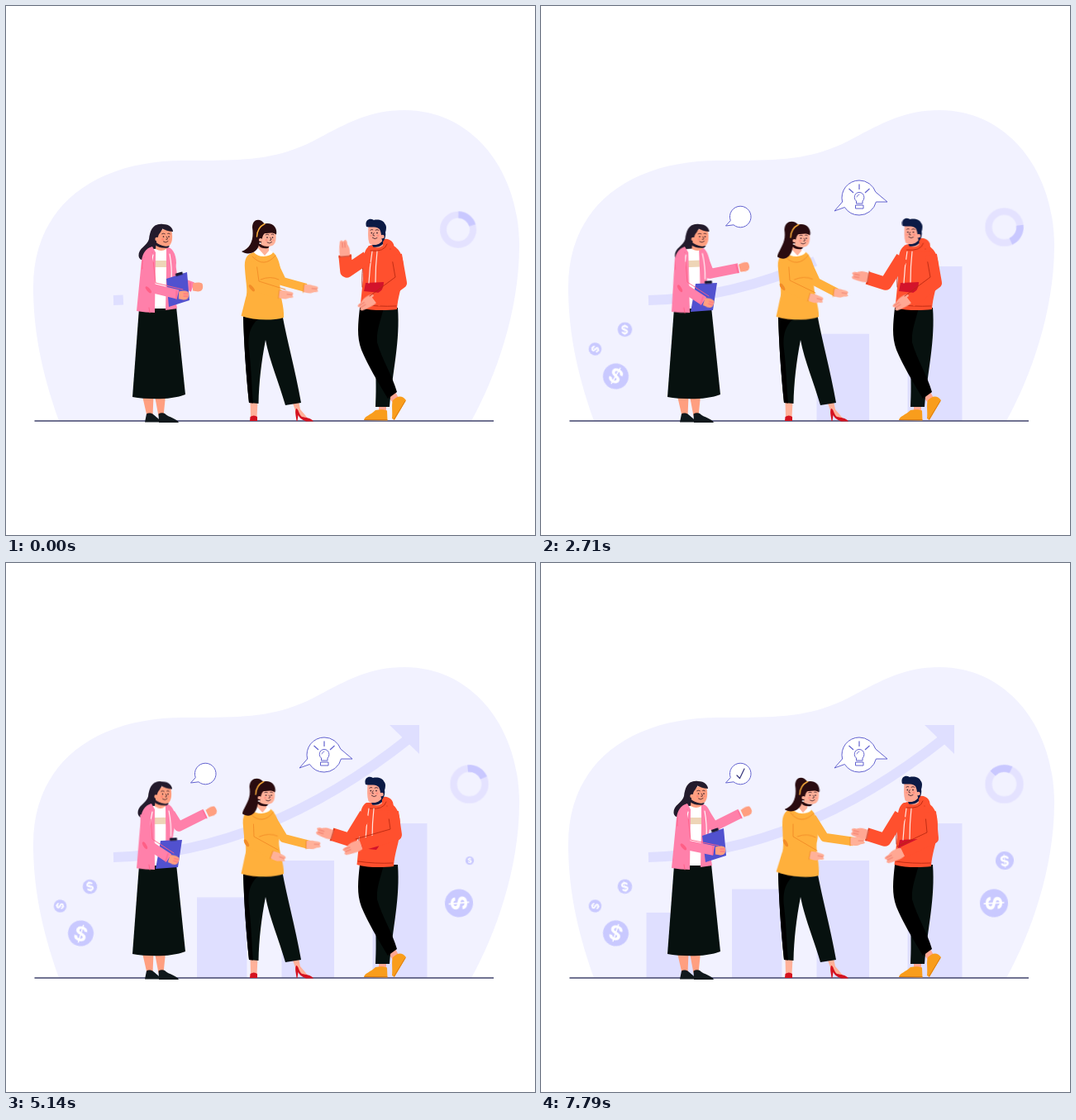
An HTML page without scripts that plays this animation: 640x640 px, repeating every 7.87 s.

```html
<!DOCTYPE html>
<html lang="en">
<head>
<meta charset="utf-8">
<title>Team meeting</title>
<style>
html,body{margin:0;width:100%;height:100%;overflow:hidden;background:#fff}
svg{display:block;width:100vw;height:100vh}
.m{animation:7.87s ease-in-out infinite}
.lin{animation-timing-function:linear}
.line{fill:none;stroke-linecap:round;stroke-linejoin:round}
.sleeve{fill:none;stroke-linejoin:round}
.crease{fill:none;stroke-width:.9;stroke-linejoin:round;stroke-linecap:round}
.ink{fill:#fff;stroke:#6262cf;stroke-width:1;stroke-linejoin:round}
.coin text{font:bold 16px Inter,"Liberation Sans",sans-serif;fill:#fff;text-anchor:middle}

/* chart */
.bar{transform-origin:0 502px;animation-timing-function:cubic-bezier(.33,.67,.67,1)}
@keyframes bar1{0%,67%{transform:scaleY(0)}98%,to{transform:none}}
@keyframes bar2{0%,44.5%{transform:scaleY(0)}74.5%,to{transform:none}}
@keyframes bar3{0%,19.5%{transform:scaleY(0)}50%,to{transform:none}}
@keyframes bar4{0%,1.6%{transform:scaleY(0)}32%,to{transform:none}}
@keyframes trend{0%{stroke-dashoffset:97}8%{stroke-dashoffset:91}20%{stroke-dashoffset:75}34.4%{stroke-dashoffset:47}47.1%{stroke-dashoffset:22}58%,to{stroke-dashoffset:0}}
@keyframes tip{0%,56.5%{transform:scale(0)}62%,to{transform:none}}
@keyframes ringIn{0%{transform:translate(547px,270.5px) scale(.95)}8%,to{transform:translate(560.5px,267.5px)}}
@keyframes ring{0%{transform:rotate(-89deg)}20%{transform:rotate(129deg)}34.4%{transform:rotate(353deg)}47.1%{transform:rotate(414deg)}65.3%{transform:rotate(624deg)}81.7%{transform:rotate(862deg)}99%,to{transform:rotate(943deg)}}

/* coins and bubbles */
@keyframes spin{to{transform:rotate(540deg)}}
@keyframes pop1{0%,4%{transform:scale(0)}10%,to{transform:none}}
@keyframes pop2{0%,12%{transform:scale(0)}19%,to{transform:none}}
@keyframes pop3{0%,23%{transform:scale(0)}30%,to{transform:none}}
@keyframes pop4{0%,45.2%{transform:scale(0)}52.5%,to{transform:none}}
@keyframes pop5{0%,62.2%{transform:scale(0)}68.7%,to{transform:none}}
@keyframes popBig{0%,1%{transform:scale(0)}7%{transform:scale(1.08)}10%,to{transform:none}}
@keyframes popSmall{0%,9%{transform:scale(0)}15%{transform:scale(1.06)}18%,to{transform:none}}
@keyframes rays{0%,22%{stroke-dashoffset:11}28%,to{stroke-dashoffset:0}}
@keyframes tick{0%,75%{stroke-dashoffset:12}80.5%,to{stroke-dashoffset:0}}

/* woman in pink */
@keyframes aBody{0%{transform:none}20%,47.1%{transform:rotate(-2.2deg)}65.3%{transform:rotate(-.8deg)}81.7%,to{transform:none}}
@keyframes aHead{0%{transform:none}20%{transform:translate(0,1px) rotate(1deg)}34.4%{transform:translate(1.5px,0)}47.1%{transform:translate(-.5px,0)}65.3%{transform:translate(-1px,.5px)}81.7%,to{transform:none}}
@keyframes aBack{
0%{d:path("M198 302L202 331L226 340")}20%{d:path("M197 302L198 330L226 340")}
34.4%{d:path("M196 303L204 324L239 317")}47.1%{d:path("M197 300L219 305L239 279")}
65.3%,to{d:path("M199 303L209 319L241 303")}}
@keyframes aBackHand{
0%,20%{transform:translate(231px,340px) rotate(0deg)}34.4%{transform:translate(245px,316px) rotate(-14deg)}
47.1%{transform:translate(241px,273px) rotate(-50deg)}65.3%,to{transform:translate(248px,301px) rotate(-25deg)}}
@keyframes aFront{
0%{d:path("M171 304L175 341L208 349")}20%,65.3%{d:path("M168 304L171 340L197 357")}
81.7%{d:path("M171 304L174 341L207 350")}99%,to{d:path("M171 304L175 341L209 348")}}
@keyframes aFrontHand{
0%{transform:translate(214px,350px) rotate(3deg)}20%,65.3%{transform:translate(202px,359px) rotate(18deg)}
81.7%{transform:translate(213px,351px) rotate(5deg)}99%,to{transform:translate(216px,348px)}}
@keyframes board{
0%{d:path("M194 330L219 322L222 356L197 364Z")}20%,65.3%{d:path("M187 336L213 335L208 368L181 370Z")}
81.7%{d:path("M193 331L218 324L220 358L196 364Z")}99%,to{d:path("M195 330L221 321L224 354L199 362Z")}}
@keyframes clip{
0%{transform:translate(209.5px,324.5px) rotate(-17deg)}20%,65.3%{transform:translate(202.5px,334.5px) rotate(-2deg)}
81.7%{transform:translate(208px,326px) rotate(-16deg)}99%,to{transform:translate(210.5px,323.5px) rotate(-18deg)}}

/* woman in yellow */
@keyframes bBody{0%{transform:none}20%,65.3%{transform:rotate(-2deg)}81.7%,to{transform:rotate(3deg)}}
@keyframes bHead{0%{transform:none}20%,65.3%{transform:translate(-1.5px,1px)}81.7%,to{transform:translate(9.5px,1px)}}
@keyframes tail{
0%,81.7%,to{d:path("M313 264C308 256 298 257 298 268C300 281 297 293 285 297C292 302 304 299 306 289C308 279 305 270 313 264Z")}
20%,65.3%{d:path("M313 264C308 257 296 258 296 270C298 284 293 288 287 302C295 308 304 304 306 291C307 281 305 272 313 264Z")}}
@keyframes bBack{
0%{d:path("M322 308L334 333L363 341")}20%{d:path("M321 308L333 332L363 343")}
34.4%{d:path("M321 308L333 334L358 347")}47.1%{d:path("M321 308L337 330L372 331")}
65.3%{d:path("M321 308L336 333L367 341")}81.7%{d:path("M328 308L338 335L363 350")}
99%,to{d:path("M328 308L343 332L378 337")}}
@keyframes bBackHand{
0%{transform:translate(363px,342px) rotate(6deg)}20%{transform:translate(363px,343px) rotate(6deg)}
34.4%{transform:translate(357px,347px) rotate(8deg)}47.1%{transform:translate(371px,331px) rotate(-12deg)}
65.3%{transform:translate(366px,341px) rotate(2deg)}81.7%{transform:translate(361px,350px) rotate(18deg)}
99%,to{transform:translate(377px,337px) rotate(0deg)}}
@keyframes bFront{
0%{d:path("M296 310L300 339L332 349")}20%,65.3%{d:path("M293 310L294 337L323 353")}
34.4%,47.1%{d:path("M293 310L295 338L326 353")}81.7%,to{d:path("M299 310L299 337L328 354")}}
@keyframes bFrontHand{
0%{transform:translate(333px,349px) rotate(6deg)}20%,65.3%{transform:translate(324px,354px) rotate(20deg)}
34.4%,47.1%{transform:translate(327px,353px) rotate(15deg)}81.7%,to{transform:translate(328px,354px) rotate(10deg)}}

/* man */
@keyframes cBody{0%,34.4%,47.1%{transform:none}20%{transform:translate(-5px,0)}65.3%{transform:translate(-4px,0)}81.7%,to{transform:translate(-1px,0)}}
@keyframes cHead{0%{transform:none}20%{transform:translate(-10px,0) rotate(-3deg)}34.4%{transform:translate(1.5px,-1px)}47.1%,65.3%{transform:translate(-1px,1px)}81.7%,to{transform:translate(1px,0)}}
@keyframes cLeft{
0%{d:path("M437 304L412 321L410 301")}20%{d:path("M433 304L414 336L390 330")}
34.4%,47.1%{d:path("M437 304L417 336L395 329")}65.3%,to{d:path("M435 304L416 335L394 328")}}
@keyframes cLeftHand{
0%{transform:translate(410px,300px) rotate(-95deg)}20%{transform:translate(390px,331px) rotate(-152deg)}
34.4%,47.1%{transform:translate(393px,328px) rotate(-170deg)}65.3%{transform:translate(392px,328px) rotate(-163deg)}
81.7%,to{transform:translate(392px,328px) rotate(-167deg)}}
@keyframes cRight{
0%,34.4%,47.1%{d:path("M472 301L478 335L447 358")}20%{d:path("M467 301L473 333L444 357")}
65.3%{d:path("M468 301L472 329L430 341")}81.7%,to{d:path("M471 301L474 333L438 350")}}
@keyframes cRightHand{
0%,34.4%,47.1%{transform:translate(443px,355px) rotate(148deg)}20%{transform:translate(441px,357px) rotate(148deg)}
65.3%{transform:translate(426px,342px) rotate(158deg)}81.7%,to{transform:translate(434px,351px) rotate(154deg)}}
</style>
</head>
<body>
<svg viewBox="0 0 640 640">
<defs>
  <path id="hand" d="M-3-4.5C2-6 7-5 13-4C15-3 15-1 13-1L15 1.5C14 3 12 3 10 3.2C6 5.5 1 5.5-3 4Z"/>
  <path id="fist" d="M-5-4.5C-1-6 5-6 6.5-4C8 0 7 4 4 5C1 6-2 5-5 4.5Z"/>
  <g id="face">
    <g fill="#2a1420"><circle r=".9"/><circle cx="7" r=".9"/></g>
    <path class="line" stroke="#2a1420" stroke-width=".8" d="M-2-3.500q2-1.500 4 0M5.500-4q1.500-1 3 .5M4 0q2 2.500 1 3.500h-1.500M0 6.500q3 2.500 6-.5"/>
    <g fill="#ff6a64" opacity=".4"><circle cx="-1" cy="3.500" r="1.500"/><circle cx="8" cy="3.500" r="1.200"/></g>
  </g>
  <g id="coin" class="coin"><circle r="10" fill="#c9c9ff"/><text y="5.800">$</text></g>
  <marker id="elbowA" markerUnits="userSpaceOnUse" markerWidth="14" markerHeight="14" viewBox="-7 -7 14 14" orient="auto"><ellipse cy="3.500" rx="5" ry="2" fill="#ff5f86"/></marker>
  <marker id="elbowB" markerUnits="userSpaceOnUse" markerWidth="14" markerHeight="14" viewBox="-7 -7 14 14" orient="auto"><ellipse cy="3.500" rx="5" ry="2" fill="#f28c28"/></marker>
</defs>

<rect width="640" height="640" fill="#fff"/>
<path fill="#f2f2ff" d="M64 502C42 440 33 390 33 340C33 240 110 187 215 187C290 187 328 187 378 160C412 142 440 126 482 126C565 126 621 200 621 290C621 370 592 450 563 502Z"/>

<g fill="#dfdfff">
  <rect class="m bar" style="animation-name:bar1" x="127.500" y="423" width="61" height="79"/>
  <rect class="m bar" style="animation-name:bar2" x="231" y="394.500" width="60.500" height="107.500"/>
  <rect class="m bar" style="animation-name:bar3" x="333.500" y="360" width="63.500" height="142"/>
  <rect class="m bar" style="animation-name:bar4" x="443.500" y="315" width="66" height="187"/>
  <path class="m lin" style="animation-name:trend" fill="none" stroke="#dfdfff" stroke-width="12" pathLength="100" stroke-dasharray="100" d="M130 356C270 352 390 290 488 212"/>
  <path class="m" style="animation-name:tip;transform-origin:482px 214px" d="M464 196H500V231Z"/>
</g>

<g class="m" style="animation-name:ringIn" fill="none" stroke-width="8.500">
  <circle r="19" stroke="#e4e2ff"/>
  <circle class="m lin" style="animation-name:ring" r="19" stroke="#c9c8ff" pathLength="100" stroke-dasharray="20 80"/>
</g>

<g transform="translate(101.500 391.500) scale(.88)"><g class="m" style="animation-name:pop1"><g class="m lin" style="animation-name:spin"><use href="#coin" transform="rotate(-6)"/></g></g></g>
<g transform="translate(65.500 415) scale(.77)"><g class="m" style="animation-name:pop2"><g class="m lin" style="animation-name:spin"><use href="#coin" transform="rotate(-74)"/></g></g></g>
<g transform="translate(90.500 448) scale(1.550)"><g class="m" style="animation-name:pop3"><g class="m lin" style="animation-name:spin"><use href="#coin" transform="rotate(24)"/></g></g></g>
<g transform="translate(548 411.500) scale(1.700)"><g class="m" style="animation-name:pop4"><g class="m lin" style="animation-name:spin"><use href="#coin" transform="rotate(-88)"/></g></g></g>
<g transform="translate(561 360) scale(1.100)"><g class="m" style="animation-name:pop5"><g class="m lin" style="animation-name:spin"><use href="#coin" transform="rotate(0)"/></g></g></g>

<g class="m" style="animation-name:popSmall;transform-origin:224px 266px">
  <path class="ink" d="M223.500 266L229.300 259.600A12.800 12.800 0 1 1 233 264.800Z"/>
  <path class="m line" style="animation-name:tick" stroke="#33337a" stroke-width="1.200" pathLength="10" stroke-dasharray="10 20" d="M237 257L240.500 260.500L246 249"/>
</g>
<g class="m" style="animation-name:popBig;transform-origin:385px 232px">
  <path class="ink" d="M355 248L364.600 237A21 21 0 0 1 385 211A21 21 0 0 1 404.800 225L419 237L405.400 237A21 21 0 0 1 385 253A21 21 0 0 1 367.400 243.500Z"/>
</g>
<g class="m" style="animation-name:pop2;transform-origin:385px 234px">
  <path class="ink" d="M381.500 239V236C377.500 233 379 225.500 385 225.500S392.500 233 389 236V239ZM380.500 241H390V245H380.500Z"/>
  <path class="line" stroke="#6262cf" stroke-width=".8" d="M382 231q.5-2.500 3-3"/>
</g>
<g fill="none" stroke="#6262cf" stroke-width="1.200">
  <path class="m" style="animation-name:rays" pathLength="10" stroke-dasharray="10 20" d="M385 222V215.500"/>
  <path class="m" style="animation-name:rays" pathLength="10" stroke-dasharray="10 20" d="M378 226L372.500 221"/>
  <path class="m" style="animation-name:rays" pathLength="10" stroke-dasharray="10 20" d="M392 226L397.500 221"/>
</g>

<path stroke="#41436c" stroke-width="1.300" d="M34.500 502H590"/>

<!-- woman in pink -->
<g>
  <path fill="#ff9f80" d="M165 472H178.500L177.500 496H170.500ZM180 472H193L190.500 496H184.500Z"/>
  <path fill="#10181c" d="M170 493.500C172 492 176 492 178 494C181 497 186 499 186 503.500H168ZM184.500 493.500C187 492 190 492 192 493C197 498 207 499 209 504H185Z"/>
  <path fill="#07110f" d="M161 366L206 364L217 470C200 477 170 476 153 473Z"/>
  <path class="m sleeve" style="animation-name:aBack" stroke="#ff80aa" stroke-width="11.500"/>
  <g class="m" style="animation-name:aBackHand"><use href="#fist" fill="#ff9f80"/><path class="crease" stroke="#ff5f86" d="M-8-5V5"/></g>
  <g class="m" style="animation-name:aHead;transform-origin:188px 292px">
    <path fill="#231b2c" d="M188 264C177 263 174 273 173 282C171 290 160 293 160.500 302C161 309 170 310 178 302L192 292Z"/>
  </g>
  <g class="m" style="animation-name:aBody;transform-origin:182px 370px">
    <path fill="#fff" d="M178 294L196 293L198 366H178Z"/>
    <path fill="#eed5b7" d="M179 308H195V316H179Z"/>
    <path fill="#ff80aa" d="M177 291C169 293 165.500 299 164 308L158 369C165 370 173 371 180 371L181 298ZM194 291C201 292 206 300 206 311L202 334L207 366L193 368L194 320Z"/>
    <path class="line" stroke="#fff" stroke-width="1.100" d="M178 301Q174 318 175 334M198 300Q201 316 200 331"/>
    <path class="crease" stroke="#ff5f86" d="M167 304Q164 310 165 318M173 365L174 371"/>
  </g>
  <g class="m" style="animation-name:aHead;transform-origin:188px 292px">
    <path fill="#ff9f80" d="M182 284H194V294Q188 298 181 294Z"/>
    <path fill="#231b2c" d="M181 285Q185 291 198 290L196 292.500Q185 293.500 180.500 289Z"/>
    <path fill="#ff9f80" d="M183 272C190 270 198 268 200 270C201.500 277 202 284 198.500 289C194 292.500 187 290 183 286Z"/>
    <path fill="#231b2c" d="M178 286C174 270 182 262 190 264C198 264 202 269 202 273C196 273 191 270 189 269.500C187 275 184 276 184 280C181 279 180 284 182 288Z"/>
    <circle cx="182.500" cy="282" r="2.200" fill="#ff9f80"/>
    <use href="#face" transform="translate(190.500 279) scale(.93)"/>
  </g>
  <path class="m" style="animation-name:board" fill="#5151cf"/>
  <rect class="m" style="animation-name:clip" x="-4.500" y="-2" width="9" height="3.500" rx="1" fill="#191a33"/>
  <path class="m sleeve" style="animation-name:aFront;marker-mid:url(#elbowA)" stroke="#ff80aa" stroke-width="11.500"/>
  <path class="m crease" style="animation-name:aFront;transform:translate(6px,-6px)" stroke="#ff5f86" stroke-dasharray="0 12 80"/>
  <g class="m" style="animation-name:aFrontHand"><use href="#fist" fill="#ff9f80"/><path class="crease" stroke="#ff5f86" d="M-8-5V5M1-2H6M1 1H6"/></g>
</g>

<!-- woman in yellow -->
<g>
  <path fill="#ffb199" d="M295.500 478H304.500L303.500 498H296ZM346 478L354 478L356 488L367 501H361L351 492Z"/>
  <path fill="#d5121f" d="M295.500 497Q300 494 304 497V502H295ZM351 487C354 487 354 494 358 497C362 498 369 498 372 502.500H363C357 500 355 498 353.500 495L352.500 502H351.500C351 496 349 491 351 487Z"/>
  <path fill="#07110f" d="M287 372L334 372C340 405 350 440 357 480L338 483C330 455 319 430 314 404C309 430 306 455 305.500 481L294 480C290 440 288 410 287 372Z"/>
  <path d="M287 376H308C297 385 292 395 294 415C297 440 297 460 299 480.500L294 480C290 440 288 410 287 376Z"/>
  <path class="m sleeve" style="animation-name:bBack" stroke="#ffb03c" stroke-width="10.500"/>
  <g class="m" style="animation-name:bBackHand"><use href="#hand" fill="#ffb199"/><path class="crease" stroke="#f28c28" d="M-3-5V5"/><path class="crease" stroke="#ee8170" d="M7-1H13"/></g>
  <g class="m" style="animation-name:bBody;transform-origin:312px 376px">
    <path fill="#ffb199" d="M305 284H318V302H305Z"/>
    <path fill="#fff" d="M299 299L305 293L313 302L319 295L325 300L322 308H300Z"/>
    <path fill="#ffb03c" d="M300 298C291 300 288 306 289 318C290 335 293 345 290 353L284.500 375C300 380.500 322 381 336 377C337 364 331 350 331.500 338C335 324 331 304 323 298C321 303 306 306 300 298Z"/>
    <path class="crease" stroke="#f28c28" d="M298 303Q312 318 326 302M308 331Q320 326 330 331"/>
  </g>
  <g class="m" style="animation-name:bHead;transform-origin:312px 292px">
    <path class="m" style="animation-name:tail" fill="#2a0c10"/>
    <path fill="#2a0c10" d="M306 286Q310 292 319 290.500L317 293Q309 294 306 290Z"/>
    <path fill="#ffb199" d="M309 272L326 271C327 279 327.500 286 323 289.500C317 292.500 311 290 309 286Z"/>
    <path fill="#2a0c10" d="M305 289C302.500 276 304 264 316 263C324 263 328.500 269 327 276.500C322 273 318 275.500 313 275C309.500 278 310 283 308 289Z"/>
    <path class="line" stroke="#ffb03c" stroke-width="1.400" d="M313 263.500Q304 268 303.500 279"/>
    <circle cx="308" cy="283" r="2.100" fill="#ffb199"/><circle cx="307.500" cy="287" r="1.100" fill="#fff"/>
    <use href="#face" transform="translate(316 280) scale(.93)"/>
  </g>
  <path class="m sleeve" style="animation-name:bFront;marker-mid:url(#elbowB)" stroke="#ffb03c" stroke-width="11.500"/>
  <path class="m crease" style="animation-name:bFront;transform:translate(6px,-6px)" stroke="#f28c28" stroke-dasharray="0 12 80"/>
  <g class="m" style="animation-name:bFrontHand"><use href="#hand" fill="#ffb199"/><path class="crease" stroke="#f28c28" d="M-3-5V5"/><path class="crease" stroke="#ee8170" d="M7-1H13"/></g>
</g>

<!-- man -->
<g>
  <path fill="#ffa793" d="M451 482H460V491H451ZM461 471L470 465L476 476L468 480Z"/>
  <path fill="#f99d1c" d="M433 501C434 496 441 495 447 489C452 488 457 488 461 489.500L461.500 501.500ZM468 477C473 472 479 470 484 477L470 501L467 499C468 491 466 483 468 477Z"/>
  <path class="line" stroke="#d97a10" stroke-width=".9" d="M434 500.500H461M483 478L469.500 500"/>
  <path fill="#07110f" d="M444 365H474C477 405 468 440 464 485H447C449 455 446 410 444 365Z"/>
  <path d="M428 365H457C453 382 448 392 449 407C455 428 467 446 473 467L462 475C450 455 438 435 430 416C424 400 426 384 428 365Z"/>
  <g class="m" style="animation-name:cBody">
    <path fill="#ff502e" d="M440 290C431 295 432 312 432 330L428.500 365C443 369 460 368.500 473 367C474 352 478 343 480 330C483 308 479 295 467 289Z"/>
    <path fill="#d3132b" d="M435 335L457 334Q457 342 452 347L433 345Z"/>
    <path class="crease" stroke="#b92a12" d="M433 304Q430 325 431 340M430 361Q450 364 472 363"/>
  </g>
  <g class="m" style="animation-name:cHead;transform-origin:450px 292px">
    <path fill="#ff502e" d="M438 291C442 287 453 292 456 282C465 280 472 287 469 297C460 301 442 299 438 291Z"/>
    <path class="crease" stroke="#b92a12" d="M441 296Q458 298 461 288"/>
    <path fill="#ffa793" d="M443 282H456V290Q449 295 443 290Z"/>
    <path fill="#0b1a45" d="M443 289Q452 288.500 456 283L456 288Q450 293 444 291.500Z"/>
    <path fill="#ffa793" d="M438.500 266H455L456 283C452 290 443 290.500 439.500 287C437.500 281 438 274 438.500 266Z"/>
    <path fill="#0b1a45" d="M436 267C433.500 259 440 255.500 445 259C451 257.500 457 260 458 263C461 266 460 270 459 274C460 279 458 283 455.500 286C454 280 454.500 275 452 270C447 266 441 268.500 436 267Z"/>
    <circle cx="455.500" cy="279" r="2.300" fill="#ffa793"/>
    <use href="#face" transform="translate(449 274.500) scale(-.95 .95)"/>
  </g>
  <g class="m" style="animation-name:cBody">
    <path class="line" stroke="#ffe5df" stroke-width="1.200" d="M443 297Q440 315 439 335M449 297Q447 315 447 334"/>
  </g>
  <path class="m sleeve" style="animation-name:cLeft" stroke="#ff502e" stroke-width="15.500"/>
  <g class="m" style="animation-name:cLeftHand"><use href="#hand" fill="#ffa793" transform="scale(1.150 1.250)"/><path class="crease" stroke="#b92a12" d="M-3-7.500V7.500"/><path class="crease" stroke="#ee7466" d="M8-2H14M8 1H14"/></g>
  <g class="m" style="animation-name:cRightHand"><use href="#hand" fill="#ffa793" transform="scale(1.300)"/><path class="crease" stroke="#ee7466" d="M10-1H17M10 2H17"/></g>
  <path class="m sleeve" style="animation-name:cRight" stroke="#ff502e" stroke-width="14"/>
  <path class="m crease" style="animation-name:cRight;transform:translate(-7px,-7px)" stroke="#b92a12" stroke-dasharray="0 16 60"/>
</g>
</svg>
</body>
</html>
```
